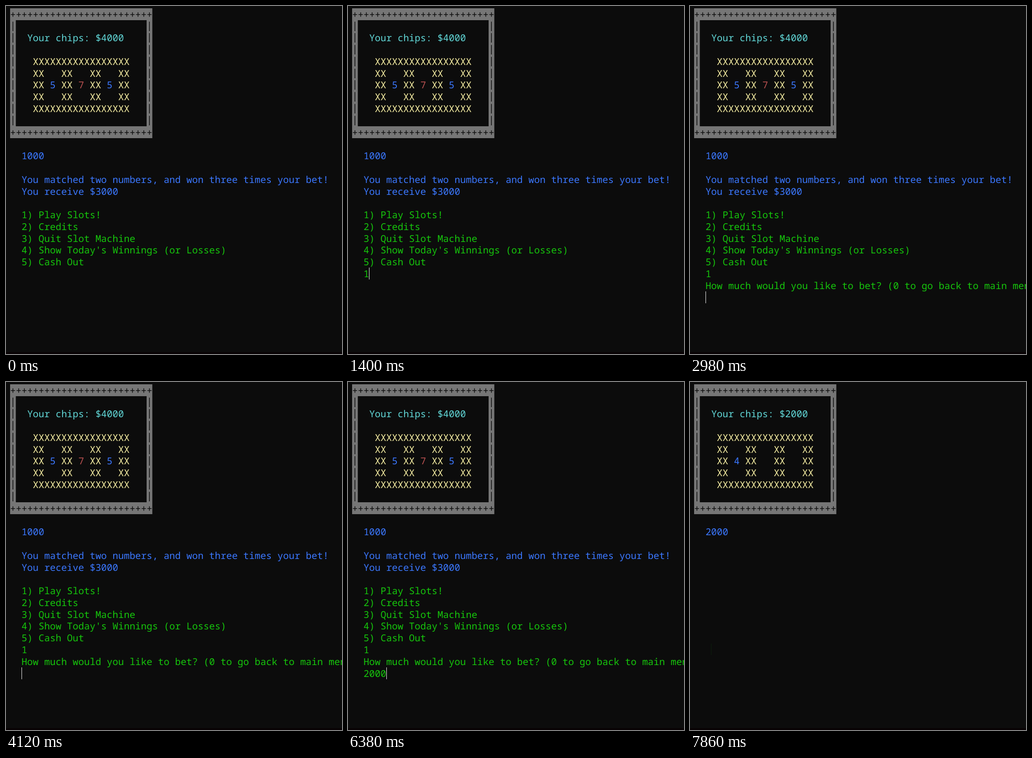
These frames come from a looping animation (736x761 px, 8000 ms). An HTML page:

```html
<!DOCTYPE html>
<html lang="en">
<head>
<meta charset="utf-8">
<title>Slot machine terminal</title>
<style>
  html, body { margin: 0; height: 100%; overflow: hidden; background: #0c0c0c; }
  svg { display: block; width: 100%; height: 100%; }
  text {
    font: 500 20.77px "Noto Sans Mono", "DejaVu Sans Mono", monospace;
    font-variant-ligatures: none;
    white-space: pre;
    text-rendering: geometricPrecision;
  }
</style>
</head>
<body>
<svg id="screen" viewBox="0 0 736 761"></svg>
<script>
const LOOP = 8000;
const CELL_W = 12.46, CELL_H = 25.78, LEFT = 9, TOP = 5.5, BASELINE = 20.3;
const COLOR = {
  back: '#0c0c0c', frame: '#767676', cyan: '#61d6d6', yellow: '#f9f1a5',
  blue: '#3b78ff', red: '#b85050', green: '#16c60c', caret: '#f2f2f2'
};
const screen = document.getElementById('screen');
const colX = col => LEFT + col * CELL_W;
const rowY = row => TOP + row * CELL_H;

function add(parent, tag, attrs) {
  const node = document.createElementNS('http://www.w3.org/2000/svg', tag);
  for (const key in attrs) node.setAttribute(key, attrs[key]);
  return parent.appendChild(node);
}
function rect(parent, x, y, width, height, fill) {
  return add(parent, 'rect', { x, y, width, height, fill });
}
function print(parent, col, row, string, fill, lift = 0) {
  const node = add(parent, 'text', { x: colX(col), y: rowY(row) + BASELINE - lift, fill });
  node.textContent = string;
  return node;
}
const show = (node, on) => node.setAttribute('visibility', on ? 'visible' : 'hidden');

function drawMachine() {
  rect(screen, 0, 0, 736, 761, COLOR.back);
  rect(screen, 0, 757, 736, 4, '#080204');
  rect(screen, 9, 5, 311.5, 284, COLOR.frame);
  rect(screen, 21.5, 31, 286.5, 232, COLOR.back);
  for (const row of [0, 10]) print(screen, 0, row, '+'.repeat(25), COLOR.back);
  for (let row = 1; row < 10; row++)
    for (const col of [0, 24]) print(screen, col, row, '|', COLOR.back, 2);
  for (let row = 4; row <= 8; row++) {
    const solid = row === 4 || row === 8;
    print(screen, 4, row, solid ? 'X'.repeat(17) : 'XX   XX   XX   XX', COLOR.yellow);
  }
}

drawMachine();
const chips = print(screen, 3, 2, '', COLOR.cyan);
const bet = print(screen, 2, 12, '', COLOR.blue);

const lastRound = add(screen, 'g', {});
print(lastRound, 7, 6, '5', COLOR.blue);
print(lastRound, 12, 6, '7', COLOR.red);
print(lastRound, 17, 6, '5', COLOR.blue);
print(lastRound, 2, 14, 'You matched two numbers, and won three times your bet!', COLOR.blue);
print(lastRound, 2, 15, 'You receive $3000', COLOR.blue);
['Play Slots!', 'Credits', 'Quit Slot Machine', "Show Today's Winnings (or Losses)", 'Cash Out']
  .forEach((item, i) => print(lastRound, 2, 17 + i, `${i + 1}) ${item}`, COLOR.green));
const choice = print(lastRound, 2, 22, '1', COLOR.green);
const question = print(lastRound, 2, 23,
  'How much would you like to bet? (0 to go back to main menu)', COLOR.green);
const answer = print(lastRound, 2, 24, '', COLOR.green);

const nextRound = add(screen, 'g', {});
rect(nextRound, 46, 572, 1, 25, '#0c200c');
const firstReel = print(nextRound, 7, 6, '4', COLOR.blue);

const caret = rect(screen, 0, 0, 1, 26, COLOR.caret);

// [time, caret column, caret row]; a bare time hides the caret.
const caretSteps = [
  [0], [410, 2, 22], [940], [1400, 3, 22],
  [1860, 2, 24], [2450], [2980, 2, 24], [3570], [4120, 2, 24], [4660], [5180, 2, 24], [5780],
  [5850, 3, 24], [6050, 4, 24], [6250, 5, 24], [6380, 6, 24],
  [6710, 18, 6], [7240], [7720, 8, 6], [7860]
];
const keyTimes = [5850, 6050, 6250, 6380];

function render(t) {
  const spinning = t >= 6710;
  chips.textContent = `Your chips: $${spinning ? 2000 : 4000}`;
  bet.textContent = spinning ? '2000' : '1000';
  show(lastRound, !spinning);
  show(choice, t >= 1400 && !spinning);
  show(question, t >= 1860 && !spinning);
  answer.textContent = '2000'.slice(0, keyTimes.filter(time => t >= time).length);
  show(nextRound, spinning);
  show(firstReel, t >= 7720);

  const [, col, row] = caretSteps.findLast(step => t >= step[0]);
  show(caret, col !== undefined);
  if (col !== undefined) {
    caret.setAttribute('x', Math.round(colX(col)));
    caret.setAttribute('y', Math.floor(rowY(row)));
  }
}

const start = performance.now();
function tick() {
  render((performance.now() - start) % LOOP);
  requestAnimationFrame(tick);
}
tick();
</script>
</body>
</html>
```
